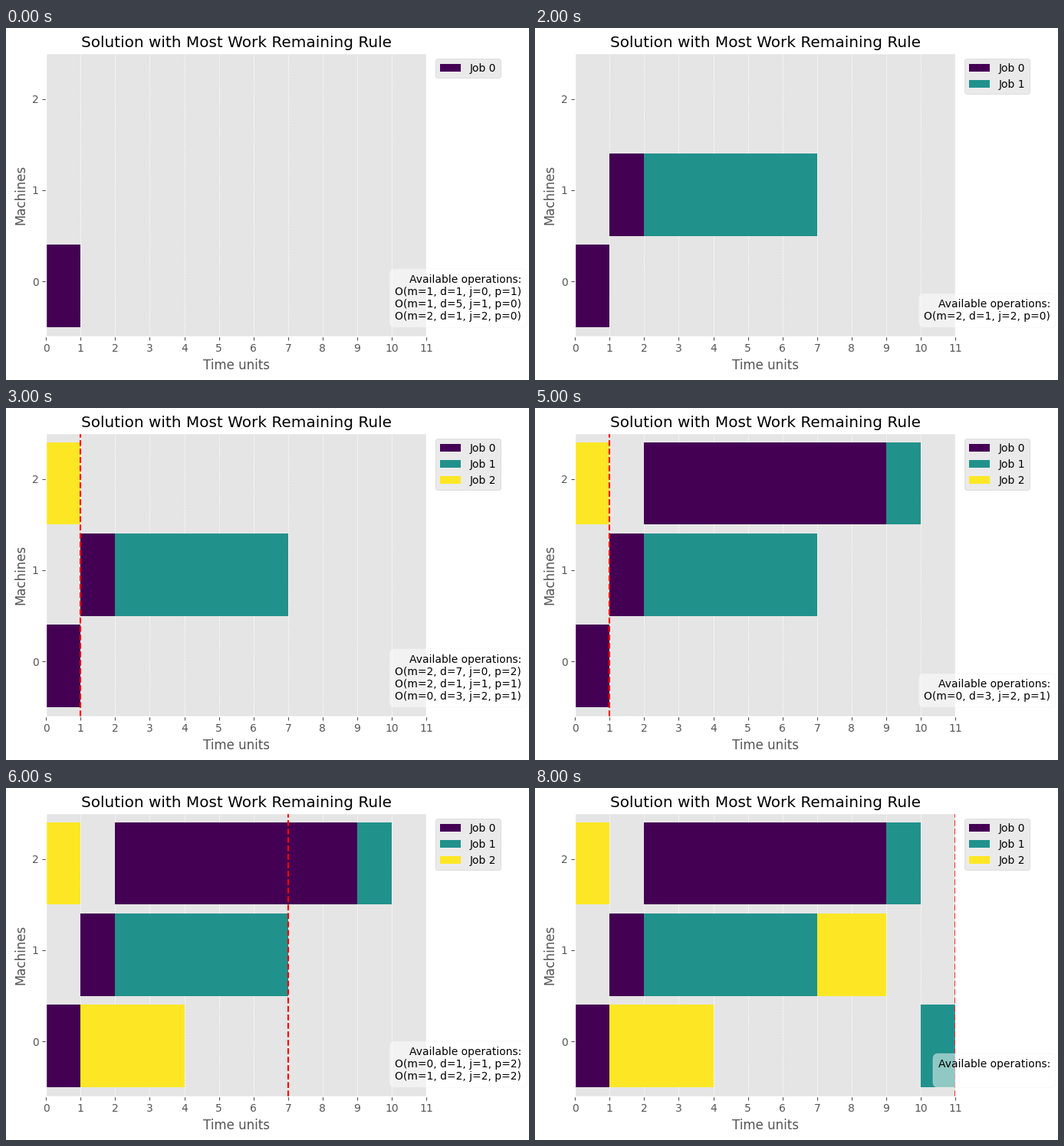
These frames come from a looping animation (682x460 px, 9000 ms). A matplotlib script:

```python
import matplotlib.pyplot as plt
from matplotlib.animation import FuncAnimation
from matplotlib.patches import Patch

plt.style.use("ggplot")

W, H, DPI = 682, 460, 100
AX_W, AX_H = 496, 369.6
PAD = 0.1  # inches around the tight layout

# Each job is a list of (machine, duration)
JOBS = [
    [(0, 1), (1, 1), (2, 7)],
    [(1, 5), (2, 1), (0, 1)],
    [(2, 1), (0, 3), (1, 2)],
]
ORDER = [0, 0, 1, 2, 0, 1, 2, 1, 2]  # job dispatched at each step
END = 11
COLORS = [plt.get_cmap("viridis")(j / 2) for j in range(3)]


def dispatch(steps):
    """Return scheduled bars, available operations and the current time."""
    job_free, machine_free, done = [0] * 3, [0] * 3, [0] * 3
    bars = []
    for j in ORDER[:steps]:
        m, d = JOBS[j][done[j]]
        start = max(job_free[j], machine_free[m])
        bars.append((m, start, d, j))
        job_free[j] = machine_free[m] = start + d
        done[j] += 1

    ready = []
    for j, ops in enumerate(JOBS):
        if done[j] < len(ops):
            m, d = ops[done[j]]
            ready.append((m, d, j, done[j], max(job_free[j], machine_free[m])))
    # Drop operations that cannot start before another one would finish
    first_end = {m: min(o[4] + o[1] for o in ready if o[0] == m) for m, *_ in ready}
    ready = [o for o in ready if o[4] < first_end[o[0]]]
    now = min((o[4] for o in ready), default=END)
    return bars, ready, now


def draw(i):
    bars, ready, now = dispatch(i + 1)
    ax.clear()
    ax.set_title("Solution with Most Work Remaining Rule")
    ax.set_xlabel("Time units")
    ax.set_ylabel("Machines")
    ax.grid(True, axis="x", linestyle="--", linewidth=0.5)
    ax.grid(False, axis="y")

    for m, start, d, j in bars:
        ax.broken_barh([(start, d)], (1 + 10 * m, 9), facecolors=COLORS[j])
    ax.set_xlim(0, END)
    ax.set_ylim(0, 31)
    ax.set_xticks(range(END + 1))
    ax.set_yticks([6, 16, 26], ["0", "1", "2"])

    jobs = sorted({bar[3] for bar in bars})
    ax.legend(
        handles=[Patch(facecolor=COLORS[j], label=f"Job {j}") for j in jobs],
        loc="upper left",
        bbox_to_anchor=(1.01, 1),
    )
    if now:
        ax.axvline(now, color="red", linestyle="--")

    lines = [f"O(m={m}, d={d}, j={j}, p={p})" for m, d, j, p, _ in ready]
    ax.text(
        1.25, 0.05, "Available operations:\n" + "\n".join(lines),
        fontsize=10, ha="right", va="bottom", transform=ax.transAxes,
        bbox=dict(facecolor="white", alpha=0.5, boxstyle="round,pad=0.5"),
    )


def place(x, y):
    ax.set_position([x * DPI / W, y * DPI / H, AX_W / W, AX_H / H])


# The small surplus keeps the pixel size from rounding down
fig = plt.figure(figsize=((W + 0.01) / DPI, (H + 0.01) / DPI), dpi=DPI)
ax = fig.add_subplot()

# Shift the axes so the labels sit exactly PAD from the left and bottom edges
x0, y0 = 0.52, 0.568
place(x0, y0)
draw(0)
tight = fig.get_tightbbox()
place(x0 + PAD - tight.x0, y0 + PAD - tight.y0)

anim = FuncAnimation(fig, draw, frames=9, interval=1000, repeat=True, repeat_delay=0)
plt.show()
```
